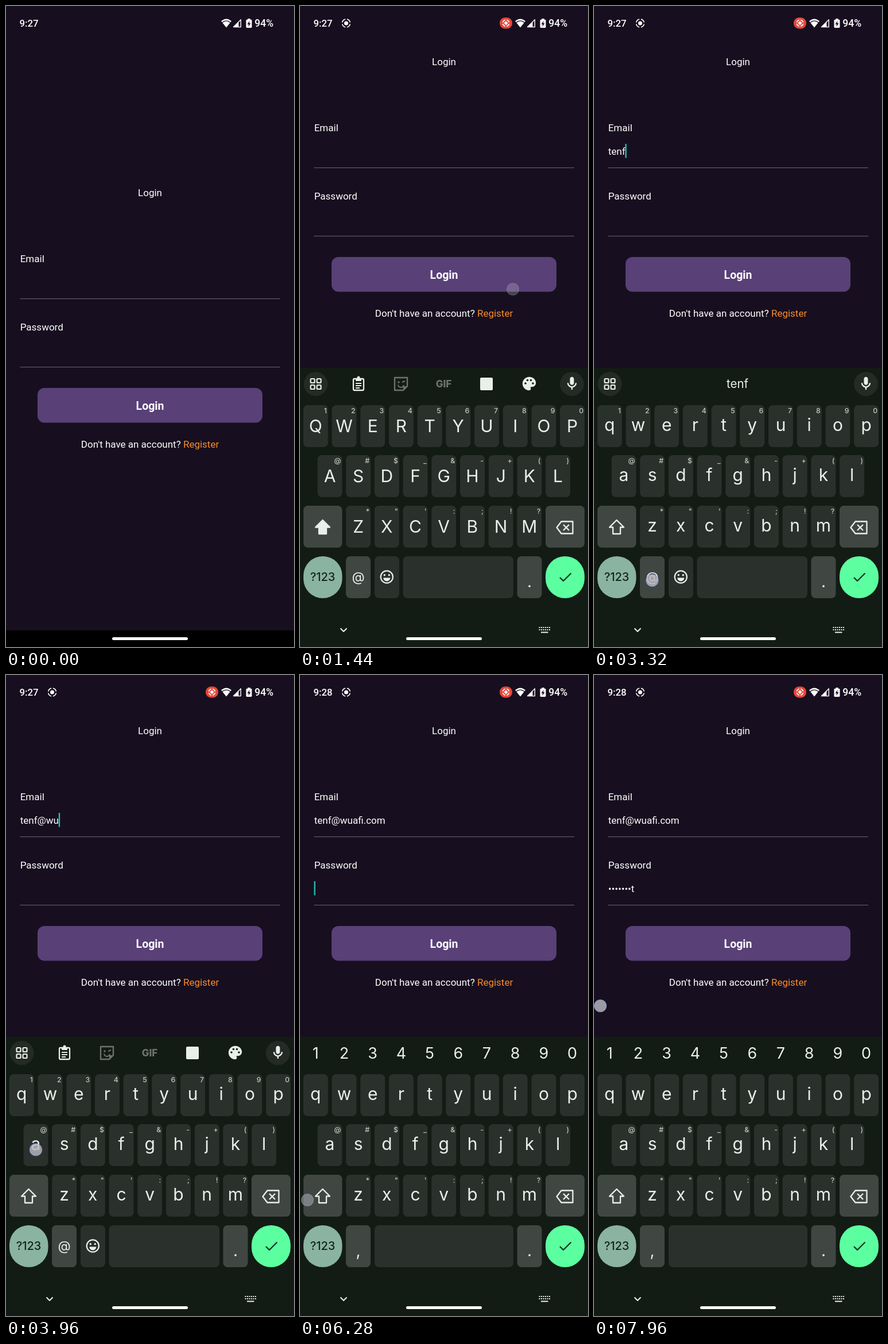
An HTML page with a canvas for the animation above (8000 ms loop, 502 px wide and 1116 px high).

```html
<!DOCTYPE html>
<html lang="en">
<head>
<meta charset="utf-8">
<title>Login</title>
<style>
  html, body { margin: 0; width: 100%; height: 100%; overflow: hidden; background: #170f1f; }
  canvas { display: block; width: 502px; height: 1116px; }
</style>
</head>
<body>
<canvas id="stage"></canvas>
<script>
const W = 502, H = 1116, LOOP = 8000;
const canvas = document.getElementById('stage');
const ratio = window.devicePixelRatio || 1;
canvas.width = W * ratio;
canvas.height = H * ratio;
const ctx = canvas.getContext('2d');

const APP = 'Roboto, sans-serif', KEYS = 'Inter, sans-serif';
const C = {
  bg: '#170f1f', board: '#131b15', key: '#2a312c', special: '#404642',
  ink: '#e9f0ea', dim: '#6c736d', hint: '#c3cac4', caret: '#27c4b4',
  mint: '#8ab3a2', green: '#5cffa0', button: '#594077', orange: '#f98b2b'
};
const ROWS = [
  { chars: 'qwertyuiop', x: 27.3, y: 695, hints: '1234567890' },
  { chars: 'asdfghjkl', x: 52, y: 782, hints: '@#$_&-+()' },
  { chars: 'zxcvbnm', x: 101.6, y: 870, hints: '*"\':;!?' }
];
const PITCH = 49.7, SHIFT = 228;

// Timeline (ms)
const HOLD = 80, FADE = 130;
const RECORD_ON = 200, KB_START = 1340, KB_END = 1430, RESIZE = 1390;
const PASS_FOCUS = 5820, MINUTE = 5900;
const EMAIL = 'tenf@wuafi.com', PASS = 'testtest';
const emailAt = [2260, 2580, 2800, 3020, 3260, 3500, 3720, 3940, 4160, 4380, 4560, 4740, 4900, 5120];
const passAt = [...PASS].map((_, i) => 6420 + i * 135);
const slip = { 1: 7, 12: -17 };

function keyPos(ch) {
  if (ch === '@') return [101.5, 1000];
  if (ch === '.') return [400, 1000];
  const row = ROWS.find(r => r.chars.includes(ch));
  return [row.x + row.chars.indexOf(ch) * PITCH, row.y + 44.5];
}
function keyTaps(text, times, offsets = {}) {
  return times.map((t, i) => {
    const [x, y] = keyPos(text[i]);
    return [t, x + (offsets[i] || 0), y];
  });
}
const taps = [
  [1280, 371, 493], [5720, 330, 372], [6150, 13, 914], [7900, 11, 576, 300],
  ...keyTaps(EMAIL, emailAt, slip), ...keyTaps(PASS, passAt)
];

const typed = (times, t) => times.filter(p => t >= p + HOLD).length;

// Drawing helpers
function text(s, x, y, size, { font = APP, weight = 400, color = '#fff', align = 'left' } = {}) {
  ctx.font = `${weight} ${size}px ${font}`;
  ctx.fillStyle = color;
  ctx.textAlign = align;
  ctx.fillText(s, x, y);
}
function box(x, y, w, h, r, color) {
  ctx.fillStyle = color;
  ctx.beginPath();
  ctx.roundRect(x, y, w, h, r);
  ctx.fill();
}
function disc(x, y, r, color) {
  ctx.fillStyle = color;
  ctx.beginPath();
  ctx.arc(x, y, r, 0, Math.PI * 2);
  ctx.fill();
}
function trace(points, closed) {
  ctx.beginPath();
  points.forEach(([x, y]) => ctx.lineTo(x, y));
  if (closed) ctx.closePath();
}
function line(points, color, width, closed = false) {
  trace(points, closed);
  ctx.strokeStyle = color;
  ctx.lineWidth = width;
  ctx.stroke();
}
function poly(points, color) {
  trace(points, true);
  ctx.fillStyle = color;
  ctx.fill();
}
function frame(x, y, w, h, r, color, width) {
  ctx.strokeStyle = color;
  ctx.lineWidth = width;
  ctx.beginPath();
  ctx.roundRect(x, y, w, h, r);
  ctx.stroke();
}
function icon(path, cx, cy, size, color) {
  ctx.save();
  ctx.translate(cx - size / 2, cy - size / 2);
  ctx.scale(size / 24, size / 24);
  ctx.fillStyle = color;
  ctx.fill(path);
  ctx.restore();
}
const MIC = new Path2D('M12 14c1.66 0 3-1.34 3-3V5c0-1.66-1.34-3-3-3S9 3.34 9 5v6c0 1.66 1.34 3 3 3zm5-3c0 2.76-2.24 5-5 5s-5-2.24-5-5H5c0 3.53 2.61 6.43 6 6.92V21h2v-3.08c3.39-.49 6-3.39 6-6.92h-2z');
const PALETTE = new Path2D('M12 2C6.5 2 2 6.5 2 12s4.5 10 10 10c1.4 0 2.5-1.1 2.5-2.5 0-.6-.2-1.2-.6-1.7-.1-.1-.1-.2-.1-.3 0-.3.2-.5.5-.5H16c3.3 0 6-2.7 6-6C22 6 17.5 2 12 2z');

// Status bar
function recordMark(x, y, r) {
  disc(x, y, r * 0.5, '#fff');
  ctx.strokeStyle = '#fff';
  ctx.lineWidth = 1.6;
  for (let i = 0; i < 4; i++) {
    const a = i * Math.PI / 2 + Math.PI / 4;
    ctx.beginPath();
    ctx.arc(x, y, r, a - 0.58, a + 0.58);
    ctx.stroke();
  }
}
function statusBar(t) {
  text(t < MINUTE ? '9:27' : '9:28', 23.5, 36, 16.8, { weight: 500 });
  if (t >= RECORD_ON) {
    recordMark(80.5, 30, 7);
    box(348, 20, 22, 19.5, 9.5, '#e5473a');
    recordMark(359, 29.8, 5.6);
  }
  ctx.fillStyle = '#fff';
  ctx.beginPath();
  ctx.moveTo(384, 37.5);
  ctx.lineTo(375, 26.3);
  ctx.quadraticCurveTo(384, 18.7, 393, 26.3);
  ctx.closePath();
  ctx.fill();
  ctx.strokeStyle = C.bg;
  ctx.lineWidth = 1.3;
  ctx.beginPath();
  ctx.moveTo(376.5, 29);
  ctx.quadraticCurveTo(384, 22.6, 391.5, 29);
  ctx.stroke();
  line([[396.5, 36.6], [409.3, 36.6], [409.3, 23.8]], '#fff', 1.4, true);
  poly([[396, 37], [405.5, 37], [405.5, 27.3]], '#fff');
  box(421.3, 22, 4.5, 3, 0.5, '#fff');
  box(418.5, 23.7, 10, 14.3, 1.4, '#fff');
  poly([[424.6, 25.8], [420.6, 31.8], [423, 31.8], [422.4, 36], [426.5, 29.9], [424, 29.9]], C.bg);
  text('94%', 433.3, 36, 17.6, { weight: 500 });
}

// Form
function caretOn(t, since) {
  return Math.floor((t - since) / 500) % 2 === 0;
}
function form(t) {
  const nEmail = typed(emailAt, t), nPass = typed(passAt, t);
  const inPass = t >= PASS_FOCUS;
  ctx.save();
  if (t >= RESIZE) ctx.translate(0, -SHIFT);

  text('Login', 251, 330.7, 17, { align: 'center' });
  text('Email', 24.7, 446, 17);
  text('Password', 24.7, 565, 17);
  for (const y of [509, 628]) {
    ctx.fillStyle = '#5f5867';
    ctx.fillRect(24.5, y, 453.5, 1.2);
  }
  box(55, 665, 392, 60.5, 12, C.button);
  text('Login', 251, 703, 19.5, { weight: 700, align: 'center' });

  const ask = "Don't have an account? ";
  ctx.font = `17px ${APP}`;
  const left = 251 - ctx.measureText(ask + 'Register').width / 2;
  const askWidth = ctx.measureText(ask).width;
  text(ask, left, 769, 17);
  text('Register', left + askWidth, 769, 17, { color: C.orange });

  const email = EMAIL.slice(0, nEmail);
  const pass = nPass ? '•'.repeat(nPass - 1) + PASS[nPass - 1] : '';
  text(email, 24.7, 487, 17);
  text(pass, 24.7, 606, 17);

  let since = 580;
  if (nEmail) since = emailAt[nEmail - 1] + HOLD;
  if (inPass) since = PASS_FOCUS;
  if (nPass) since = passAt[nPass - 1] + HOLD;
  if (t >= 580 && caretOn(t, since)) {
    const x = 24.5 + ctx.measureText(inPass ? pass : email).width;
    ctx.fillStyle = C.caret;
    ctx.fillRect(x, inPass ? 587 : 468, 2.3, 24.5);
  }
  ctx.restore();
}

// Keyboard
function letterRows(upper, digitRow) {
  ROWS.forEach((row, r) => {
    [...row.chars].forEach((ch, i) => {
      const x = row.x + i * PITCH;
      box(x - 21.5, row.y, 43, 73, 7.5, C.key);
      text(upper ? ch.toUpperCase() : ch, x, row.y + (upper ? 46.7 : 45.3), 30,
        { font: KEYS, color: C.ink, align: 'center' });
      if (r > 0 || !digitRow) {
        text(row.hints[i], x + 19.5, row.y + 14, 12.3,
          { font: KEYS, weight: 500, color: C.hint, align: 'right' });
      }
    });
  });
}
function shiftKey(filled) {
  box(6, 870, 67.5, 73, 7.5, C.special);
  const arrow = [[39.5, 895], [52, 907.5], [46, 907.5], [46, 919], [33, 919], [33, 907.5], [27, 907.5]];
  line(arrow, C.ink, 2.3, true);
  if (filled) poly(arrow, C.ink);
}
function backspaceKey() {
  box(428, 870, 68, 73, 7.5, C.special);
  line([[447.5, 908], [455.5, 897.5], [475.5, 897.5], [475.5, 918.5], [455.5, 918.5]], C.ink, 2.3, true);
  line([[459, 903], [469, 913]], C.ink, 2.3);
  line([[469, 903], [459, 913]], C.ink, 2.3);
}
function bottomRow(inPass) {
  const glyph = { font: KEYS, color: C.ink, align: 'center' };
  box(6, 958, 67.5, 73, 33.7, C.mint);
  text('?123', 39.5, 1001, 20, { font: KEYS, weight: 500, color: '#14251c', align: 'center' });
  box(80, 958, 43, 73, 7.5, C.special);
  if (inPass) {
    text(',', 101.5, 1012, 28, glyph);
    box(130, 958, 242, 73, 7.5, C.key);
  } else {
    text('@', 101.5, 1002, 23, glyph);
    box(130, 958, 43, 73, 7.5, C.key);
    smile(151.3, 994);
    box(179.5, 958, 192.5, 73, 7.5, C.key);
  }
  box(378.5, 958, 43, 73, 7.5, C.special);
  text('.', 400, 1012, 28, glyph);
  box(428, 958, 68, 73, 33.9, C.green);
  line([[453, 995], [459, 1001], [472.5, 987.5]], '#0d3a22', 2.4);
}
function smile(x, y) {
  ctx.strokeStyle = C.ink;
  ctx.lineWidth = 2.2;
  ctx.beginPath();
  ctx.arc(x, y, 10.6, 0, Math.PI * 2);
  ctx.stroke();
  disc(x - 4, y - 3.2, 1.7, C.ink);
  disc(x + 4, y - 3.2, 1.7, C.ink);
  ctx.beginPath();
  ctx.arc(x, y + 1.4, 6, 0, Math.PI);
  ctx.fill();
}
function clipboard(x, y) {
  frame(x - 9, y - 9, 18, 20, 2, C.ink, 2.3);
  box(x - 5, y - 10, 10, 5, 1, C.ink);
  disc(x, y - 11, 2.5, C.ink);
  [-1, 3, 7].forEach((dy, i) => {
    ctx.fillStyle = C.ink;
    ctx.fillRect(x - 5, y + dy - 1, i < 2 ? 10 : 7, 2);
  });
}
function sticker(x, y) {
  line([[x - 11, y - 11], [x + 11, y - 11], [x + 11, y + 4], [x + 4, y + 11], [x - 11, y + 11]], C.dim, 2.4, true);
  poly([[x + 4, y + 11], [x + 4, y + 4], [x + 11, y + 4]], C.dim);
  disc(x - 4, y - 3, 1.7, C.dim);
  line([[x + 2, y - 3], [x + 7, y - 5]], C.dim, 2);
  ctx.beginPath();
  ctx.arc(x, y + 1, 5, 0.2, Math.PI - 0.1);
  ctx.stroke();
}
function toolbar(suggestion) {
  disc(27.5, 658, 21, '#242b26');
  disc(474, 658, 21, '#242b26');
  for (const dx of [-9, 2]) for (const dy of [-9, 2]) frame(27.5 + dx, 658 + dy, 7, 7, 1.5, C.ink, 2.2);
  icon(MIC, 474, 657.5, 28, C.ink);
  if (suggestion) {
    text(suggestion, 250, 665, 20.5, { font: KEYS, color: C.ink, align: 'center' });
    return;
  }
  clipboard(102, 658);
  sticker(176, 658);
  text('GIF', 250.5, 664, 17, { font: KEYS, weight: 800, color: C.dim, align: 'center' });
  box(314, 647, 22, 22, 2, C.ink);
  icon(PALETTE, 399.5, 657.5, 28, C.ink);
  for (const [dx, dy] of [[-6.5, 0], [-3, -5.5], [3, -5.5], [6.5, 0]]) disc(399.5 + dx, 657 + dy, 1.8, C.board);
}
function navIcons() {
  line([[70.5, 1083.5], [76, 1089], [81.5, 1083.5]], C.ink, 2);
  ctx.fillStyle = C.ink;
  for (let i = 0; i < 6; i++) {
    for (const y of [1081, 1085]) ctx.fillRect(416.5 + i * 3.5, y, 2, 2);
  }
  ctx.fillRect(420, 1089.5, 12.5, 2);
}
function keyboard(t) {
  if (t < KB_START) return;
  const p = Math.min(1, (t - KB_START) / (KB_END - KB_START));
  const n = typed(emailAt, t), inPass = t >= PASS_FOCUS + 60;
  ctx.save();
  ctx.translate(0, 486 * (1 - p) ** 2);
  ctx.fillStyle = C.board;
  ctx.fillRect(0, 630, W, H - 630);
  if (inPass) {
    [...'1234567890'].forEach((d, i) =>
      text(d, 27.3 + i * PITCH, 667.7, 27, { font: KEYS, color: C.ink, align: 'center' }));
  } else {
    toolbar(n <= 4 ? EMAIL.slice(0, n) : '');
  }
  letterRows(n === 0, inPass);
  shiftKey(n === 0);
  backspaceKey();
  bottomRow(inPass);
  navIcons();
  ctx.restore();
}

function touches(t) {
  for (const [start, x, y, hold = HOLD] of taps) {
    const age = t - start;
    if (age < 0 || age > hold + FADE) continue;
    ctx.globalAlpha = age < hold ? 1 : 1 - (age - hold) / FADE;
    disc(x, y, 10.5, 'rgba(186,184,192,.82)');
    ctx.strokeStyle = 'rgba(150,165,225,.8)';
    ctx.lineWidth = 1.2;
    ctx.stroke();
    ctx.globalAlpha = 1;
  }
}

function draw(t) {
  ctx.setTransform(ratio, 0, 0, ratio, 0, 0);
  ctx.lineJoin = 'round';
  ctx.fillStyle = C.bg;
  ctx.fillRect(0, 0, W, H);
  form(t);
  statusBar(t);
  ctx.fillStyle = '#000';
  ctx.fillRect(0, 1087, W, 29);
  keyboard(t);
  box(185, 1099, 132, 5, 2.5, '#fff');
  touches(t);
}

const began = performance.now();
function tick() {
  draw((performance.now() - began) % LOOP);
  requestAnimationFrame(tick);
}
tick();
</script>
</body>
</html>
```
